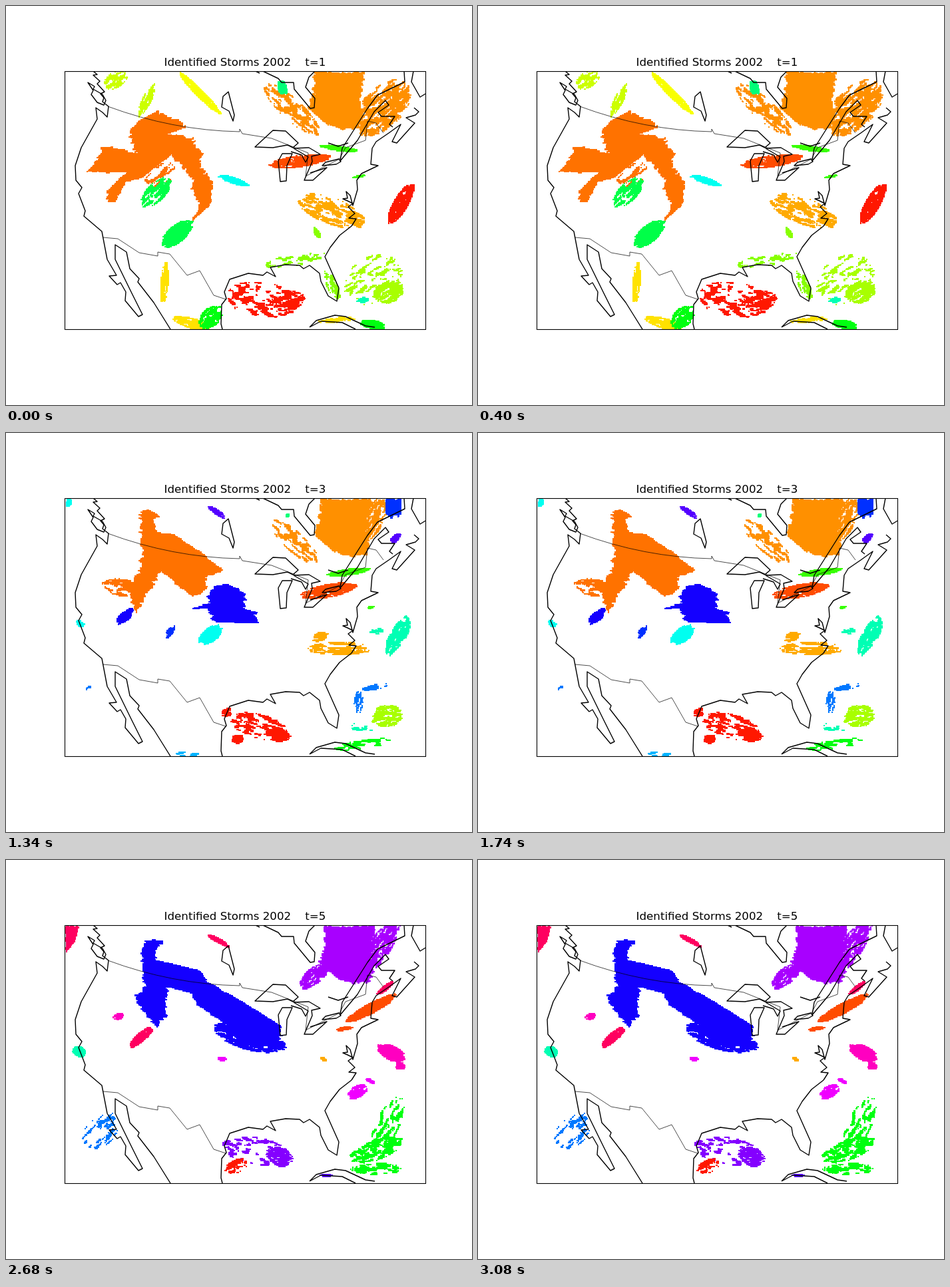
These frames come from a looping animation (700x600 px, 3350 ms). An HTML page with a canvas:

```html
<!DOCTYPE html>
<html>
<head>
<meta charset="utf-8">
<title>Storm map</title>
<style>
html, body { margin: 0; width: 100%; height: 100%; overflow: hidden; background: #fff; }
canvas { display: block; }
</style>
</head>
<body>
<canvas id="stage" width="700" height="600"></canvas>
<script>
const STEP = 670, LEFT = 88, TOP = 98, WIDTH = 542, HEIGHT = 388, CELL = 1.5;
const ctx = document.getElementById('stage').getContext('2d');
let g;

const orange = '#ff7200', tangerine = '#ff9000', amber = '#ffaa00', gold = '#ffe200', yellow = '#f8ff00';
const citron = '#ccff00', lime = '#a8ff00', leaf = '#88ff00', grass = '#38ff00', green = '#00ff10';
const emerald = '#00ff48', jade = '#00ff78', mint = '#00ffb4', cyan = '#00fff0', sky = '#00b4ff';
const azure = '#0078ff', cobalt = '#0030ff', blue = '#1400ff', indigo = '#5400ff', violet = '#8400ff';
const purple = '#a800ff', magenta = '#f000ff', pink = '#ff00c0', rose = '#ff0060', red = '#ff1800', rust = '#ff4c00';

const hash = (i, j) => {
  const s = Math.sin(i * 127.1 + j * 311.7) * 43758.5453;
  return s - Math.floor(s);
};
const mix = (a, b, t) => a + (b - a) * t * t * (3 - 2 * t);

function noise(x, y) {
  const i = Math.floor(x), j = Math.floor(y), u = x - i, v = y - j;
  return mix(mix(hash(i, j), hash(i + 1, j), u), mix(hash(i, j + 1), hash(i + 1, j + 1), u), v);
}

// Fills a path with cells; noise along the tilt frays its edge and thins it
function fray(color, path, x0, y0, x1, y1, tilt, density) {
  const c = Math.cos(tilt * Math.PI / 180), s = Math.sin(tilt * Math.PI / 180);
  const reach = Math.min(8, (x1 - x0) / 4);
  const snap = (v, origin) => origin + Math.floor((v - origin - 5) / CELL) * CELL;
  g.fillStyle = color;
  for (let y = snap(y0, TOP); y < y1 + 5; y += CELL) {
    for (let x = snap(x0, LEFT); x < x1 + 5; x += CELL) {
      const u = x * c + y * s, v = y * c - x * s;
      const shift = (noise(u / 9, v / 2.5) - .5) * reach;
      if (!g.isPointInPath(path, x + c * shift, y + s * shift)) continue;
      if (density < 1 && noise(u / 8 + 40, v / 2.8) * .75 + noise(x / 2, y / 2) * .25 > density) continue;
      g.fillRect(Math.round(x), Math.round(y), 2, 2);
    }
  }
}

function puff(color, x, y, rx, ry, tilt = 0, density = 1) {
  const path = new Path2D(), r = Math.max(rx, ry);
  path.ellipse(x, y, rx, ry, tilt * Math.PI / 180, 0, Math.PI * 2);
  fray(color, path, x - r, y - r, x + r, y + r, tilt, density);
}

function mass(color, tilt, outline, dx = 0) {
  const path = new Path2D(), n = outline.match(/\d+/g).map(Number);
  const xs = n.filter((_, i) => i % 2 === 0), ys = n.filter((_, i) => i % 2);
  path.addPath(new Path2D(outline), new DOMMatrix().translate(dx, 0));
  fray(color, path, Math.min(...xs) + dx, Math.min(...ys), Math.max(...xs) + dx, Math.max(...ys), tilt, 1);
}

// The large north-eastern storm slides slowly east
function northeast(color, t) {
  mass(color, 42, 'M462 98 538 98 530 135 534 165 530 182 505 185 480 176 452 152 460 130Z', t < 3 ? t * 5 : 16);
}

function first() {
  mass(orange, -25, 'M184 190 196 173 226 156 272 181 240 191 276 196 293 222 289 238 309 263 305 298 278 323 290 300 278 275 281 258 247 222 237 230 201 258 180 262 160 295 150 293 152 275 179 250 120 248 136 230 145 210 170 213 195 222Z');
  puff(orange, 230, 255, 25, 15, -40, .5);
  northeast(tangerine, 0);
  puff(tangerine, 564, 152, 50, 30, -45, .6);
  puff(tangerine, 428, 154, 53, 16, 42, .56);
  puff(amber, 487, 307, 52, 20, 20, .55);
  puff(gold, 237, 415, 29, 6, -85, .7);
  puff(gold, 278, 476, 28, 8, 15, .75);
  puff(gold, 498, 471, 28, 4, -5, .6);
  puff(yellow, 290, 130, 44, 6, 45, .85);
  puff(citron, 164, 109, 18, 12, -30, .6);
  puff(citron, 210, 141, 25, 7, -65, .7);
  puff(leaf, 432, 381, 46, 9, -10, .43);
  puff(leaf, 489, 420, 22, 8, 65, .55);
  puff(lime, 550, 410, 44, 34, -30, .4);
  puff(lime, 574, 430, 22, 15, -25, .7);
  puff(grass, 499, 213, 28, 4, 8);
  puff(grass, 530, 255, 10, 2, -10);
  puff(leaf, 466, 340, 9, 4, 60, .8);
  puff(green, 306, 467, 20, 14, -45, .7);
  puff(green, 550, 478, 18, 7, 10, .85);
  puff(emerald, 256, 341, 27, 13, -40, .85);
  puff(emerald, 224, 279, 28, 14, -45, .6);
  puff(jade, 414, 122, 11, 7, 70);
  puff(mint, 535, 441, 9, 4, -5, .8);
  puff(cyan, 340, 261, 23, 5, 18);
  puff(red, 385, 440, 55, 26, 8, .46);
  puff(red, 425, 443, 23, 14, -15, .6);
  puff(red, 592, 296, 33, 11, -60, .75);
  puff(rust, 440, 232, 45, 9, -8, .75);
}

function second() {
  mass(orange, 15, 'M203 114 224 126 221 148 240 151 286 171 312 213 279 220 273 236 237 221 210 239 186 281 155 294 154 280 180 254 145 247 141 237 190 210 206 152Z');
  puff(orange, 131, 247, 12, 5, -5, .8);
  northeast(tangerine, 1);
  puff(tangerine, 570, 148, 50, 30, -50, .63);
  puff(tangerine, 425, 153, 43, 17, 50, .55);
  puff(amber, 508, 318, 27, 16, 10, .65);
  puff(amber, 464, 308, 18, 9, 20, .6);
  puff(amber, 535, 299, 12, 5, -10, .6);
  puff(gold, 237, 408, 17, 5, -85, .75);
  puff(gold, 235, 438, 10, 4, -40, .6);
  puff(yellow, 281, 111, 10, 5, 40, .75);
  puff(citron, 161, 110, 14, 10, -60, .65);
  puff(lime, 567, 423, 33, 20, -5, .6);
  puff(leaf, 493, 430, 4, 4);
  puff(grass, 507, 211, 32, 4, 8);
  puff(grass, 543, 257, 18, 4, -25, .9);
  puff(green, 303, 470, 17, 9, 35, .57);
  puff(green, 548, 470, 14, 6, -25, .75);
  puff(emerald, 249, 268, 20, 8, -60, .5);
  puff(jade, 418, 122, 8, 5, 90);
  puff(mint, 530, 438, 16, 7, 15, .52);
  puff(mint, 580, 316, 28, 10, -45, .85);
  mass(cyan, -15, 'M276 233 292 226 322 228 327 255 368 262 366 272 324 264 318 295 278 335 249 364 240 367 247 347 300 305 302 265Z');
  puff(cyan, 110, 283, 2, 3);
  puff(sky, 230, 243, 11, 5, -45, .85);
  puff(sky, 276, 480, 18, 7, 10, .7);
  puff(sky, 523, 468, 10, 3, 20, .7);
  puff(azure, 543, 384, 14, 8, 15, .45);
  puff(cobalt, 242, 308, 10, 4, -55, .8);
  puff(red, 382, 443, 54, 22, 10, .48);
  puff(red, 415, 454, 13, 6, -15, .85);
  puff(red, 592, 283, 20, 7, -50, .85);
  puff(rust, 460, 237, 49, 8, -7, .9);
}

function third() {
  mass(orange, 12, 'M200 117 213 114 230 124 221 132 223 148 250 151 290 177 326 205 299 216 300 235 278 244 232 207 192 270 185 230 199 210 204 184Z');
  puff(orange, 172, 231, 27, 13, 10, .62);
  northeast(tangerine, 2);
  puff(tangerine, 548, 130, 36, 18, -60, .65);
  puff(tangerine, 432, 162, 44, 15, 42, .52);
  puff(amber, 500, 323, 46, 10, 0, .56);
  puff(amber, 471, 305, 11, 7, -20, .75);
  puff(lime, 572, 424, 23, 17, -15, .65);
  puff(grass, 513, 208, 31, 5, -8, .85);
  puff(grass, 547, 261, 5, 2, -15);
  puff(green, 536, 467, 40, 7, -8, .55);
  puff(jade, 422, 123, 3, 3);
  puff(mint, 588, 303, 32, 12, -60, .65);
  puff(mint, 556, 297, 12, 4, -5, .7);
  puff(mint, 533, 441, 17, 6, 5, .45);
  puff(cyan, 306, 302, 20, 11, -35, .9);
  puff(cyan, 110, 286, 5, 7, -50, .85);
  puff(cyan, 93, 103, 4, 7);
  puff(sky, 272, 482, 18, 4, 0, .45);
  puff(azure, 528, 405, 21, 7, -80, .42);
  puff(azure, 553, 381, 21, 4, -10, .48);
  puff(azure, 123, 383, 4, 3, -20, .7);
  puff(cobalt, 245, 298, 10, 5, -60, .55);
  mass(cobalt, 90, 'M569 98 593 98 593 121 580 126 569 120Z');
  puff(blue, 177, 275, 16, 7, -40);
  mass(blue, 8, 'M278 264 304 254 303 240 315 228 333 226 358 240 358 264 374 268 377 285 311 283 303 263Z');
  puff(indigo, 316, 118, 14, 4, 35, .85);
  puff(indigo, 584, 157, 10, 5, -45, .9);
  puff(red, 380, 440, 43, 18, 15, .47);
  puff(red, 412, 455, 14, 8, -15, .85);
  puff(red, 347, 459, 9, 7, -15, .9);
  puff(red, 331, 419, 10, 6, -20, .6);
  puff(rust, 484, 236, 41, 10, -10, .75);
}

function fourth() {
  mass(blue, 12, 'M202 138 215 119 232 120 237 131 223 146 299 183 298 194 349 211 321 222 379 234 395 279 306 280 329 266 323 239 293 238 268 213 247 193 225 209 226 230 197 267 175 280 192 248 189 216 202 199Z');
  northeast(purple, 3);
  puff(purple, 552, 128, 32, 18, -60, .72);
  puff(purple, 450, 175, 46, 14, 38, .56);
  puff(purple, 581, 106, 15, 14, -20);
  puff(violet, 314, 118, 22, 4, 28);
  puff(violet, 376, 436, 50, 22, 10, .5);
  puff(violet, 408, 449, 20, 14, 20, .66);
  puff(indigo, 496, 478, 28, 5, 10, .55);
  puff(amber, 470, 312, 13, 19, 0, .42);
  puff(grass, 526, 207, 18, 5, -15, .85);
  puff(green, 561, 440, 48, 12, -45, .63);
  puff(green, 546, 466, 46, 7, -5, .58);
  puff(cyan, 95, 109, 13, 6, -65);
  puff(mint, 109, 285, 6, 9, -50, .7);
  puff(azure, 578, 369, 30, 8, -55, .42);
  puff(azure, 551, 400, 16, 10, -70, .52);
  puff(azure, 525, 406, 14, 6, -70, .5);
  puff(azure, 131, 398, 32, 12, 65, .38);
  puff(azure, 146, 418, 11, 5, -65, .7);
  puff(pink, 164, 229, 10, 6, -20, .6);
  puff(pink, 581, 297, 24, 18, -10, .55);
  puff(magenta, 314, 299, 14, 9, 20, .65);
  puff(magenta, 543, 329, 8, 3, -5, .8);
  puff(red, 345, 459, 17, 8, -20, .72);
  puff(rust, 505, 236, 46, 9, -20);
}

function fifth() {
  mass(blue, 15, 'M203 130 211 119 235 119 224 137 224 149 294 166 299 180 358 215 411 248 410 280 347 277 341 254 287 217 280 200 240 189 238 234 223 250 192 205 207 194Z');
  puff(blue, 366, 265, 55, 20, 15, .68);
  northeast(purple, 4);
  puff(purple, 558, 132, 48, 17, -55, .67);
  puff(purple, 463, 172, 27, 12, -40, .64);
  puff(violet, 375, 437, 52, 21, 10, .43);
  puff(violet, 410, 445, 19, 14, 20, .7);
  puff(indigo, 479, 473, 9, 2);
  puff(amber, 476, 298, 3, 5, -60, .7);
  puff(green, 571, 398, 46, 18, -65, .46);
  puff(green, 555, 435, 41, 15, -20, .6);
  puff(green, 555, 463, 38, 9, 0, .56);
  puff(mint, 109, 287, 10, 8, 10, .87);
  puff(azure, 141, 406, 30, 22, -45, .42);
  mass(rose, -60, 'M88 98 109 98 101 123 89 138Z');
  puff(rose, 202, 265, 23, 7, -42, .92);
  puff(rose, 569, 191, 15, 4, -38);
  puff(rose, 318, 120, 18, 4, 28);
  puff(pink, 168, 234, 8, 5, -20, .75);
  puff(pink, 578, 289, 22, 11, 25, .82);
  puff(pink, 590, 308, 8, 6, 0, .8);
  puff(magenta, 324, 298, 7, 3, 5, .7);
  puff(magenta, 527, 347, 16, 9, -25, .7);
  puff(magenta, 546, 331, 7, 3, 30, .8);
  puff(red, 345, 459, 17, 10, -20, .66);
  puff(rust, 547, 222, 42, 8, -28, .95);
  puff(rust, 508, 252, 12, 3, -10, .8);
}

function line(path, width = 1.4) {
  g.lineWidth = width;
  g.stroke(new Path2D(path));
}

function drawMap() {
  // Pacific coast
  line('M131 98 137 103 131 104 141 113 137 117 148 129 142 132 147 138 145 144 154 151 152 167 145 160 135 153 137 170 113 213 104 240 105 262 114 273 109 282 119 308 117 316 144 339 152 381 166 405 155 406 167 419 172 416 180 430 179 443 199 467 205 464 189 432 164 381 164 359 181 370 186 395 200 410 198 415 222 446 247 486');
  line('M123 115 133 121 131 125 145 133 150 142 147 149 137 145 128 133 131 127Z');
  // Gulf and Atlantic coasts
  line('M325 486 323 478 324 449 331 440 328 430 336 411 364 402 386 405 392 400 405 407 397 393 420 389 441 390 447 395 456 390 471 402 473 414 484 436 497 444 500 424 479 377 487 363 501 345 519 331');
  line('M519 331 526 320 515 319 524 312 514 302 521 297 513 293 506 290 513 289 511 279 517 285 521 300 528 276 527 262 534 252 559 240 548 238 550 214 556 204 575 191 593 178 580 204 587 206 614 176 601 168 615 164 620 159 613 153');
  line('M598 98 599 114 558 134 543 154 505 214 502 233 528 202 553 159 570 142 575 149 559 160 564 166 584 166 576 178 581 182');
  line('M612 98 609 114 622 137 630 132');
  // Hudson Bay and lakes
  line('M375 98 381 101M386 98 409 109 414 115 432 115 433 125 457 154 463 153 464 139 450 122 455 107 464 98');
  line('M326 136 334 129 343 164 341 173 335 158 324 152Z');
  line('M374 212 401 187 420 188 439 206 431 213 423 209 401 213Z');
  line('M415 222 409 233 412 264 421 263 422 240 430 222Z');
  line('M428 219 444 224 450 235 454 227 432 214 455 213 472 223 459 226 460 234 448 262 461 262 482 243 457 251');
  line('M475 240 480 235 500 230 503 234 496 238ZM484 206 499 211 514 206');
  // Cuba
  line('M456 483 466 473 494 465 510 467 540 481 554 483M456 483 473 474 505 476 525 486');
  // Borders
  line('M153 151Q250 187 351 189L351 185 355 192 399 199 454 221 450 256 501 230 510 213 540 202 543 173 556 176 567 191', .7);
  line('M146 348 168 350 200 371 228 376 228 370 246 373 272 405 291 398 312 435 330 441', .7);
}

function render(drawStorms, index) {
  const canvas = document.createElement('canvas');
  canvas.width = 700;
  canvas.height = 600;
  g = canvas.getContext('2d');
  g.fillStyle = '#fff';
  g.fillRect(0, 0, 700, 600);
  g.save();
  g.beginPath();
  g.rect(LEFT, TOP, WIDTH, HEIGHT);
  g.clip();
  drawStorms();
  g.lineJoin = 'round';
  drawMap();
  g.restore();
  g.lineWidth = 1.1;
  g.strokeRect(LEFT + .5, TOP + .5, WIDTH, HEIGHT);
  g.fillStyle = '#000';
  g.font = '16.67px "DejaVu Sans", sans-serif';
  g.textAlign = 'center';
  g.fillText(`Identified Storms 2002    t=${index + 1}`, 359, 90);
  return canvas;
}

const scenes = [first, second, third, fourth, fifth].map(render);
const start = performance.now();

function tick() {
  const index = Math.floor((performance.now() - start) / STEP) % scenes.length;
  ctx.drawImage(scenes[index], 0, 0);
  requestAnimationFrame(tick);
}
tick();
</script>
</body>
</html>
```
